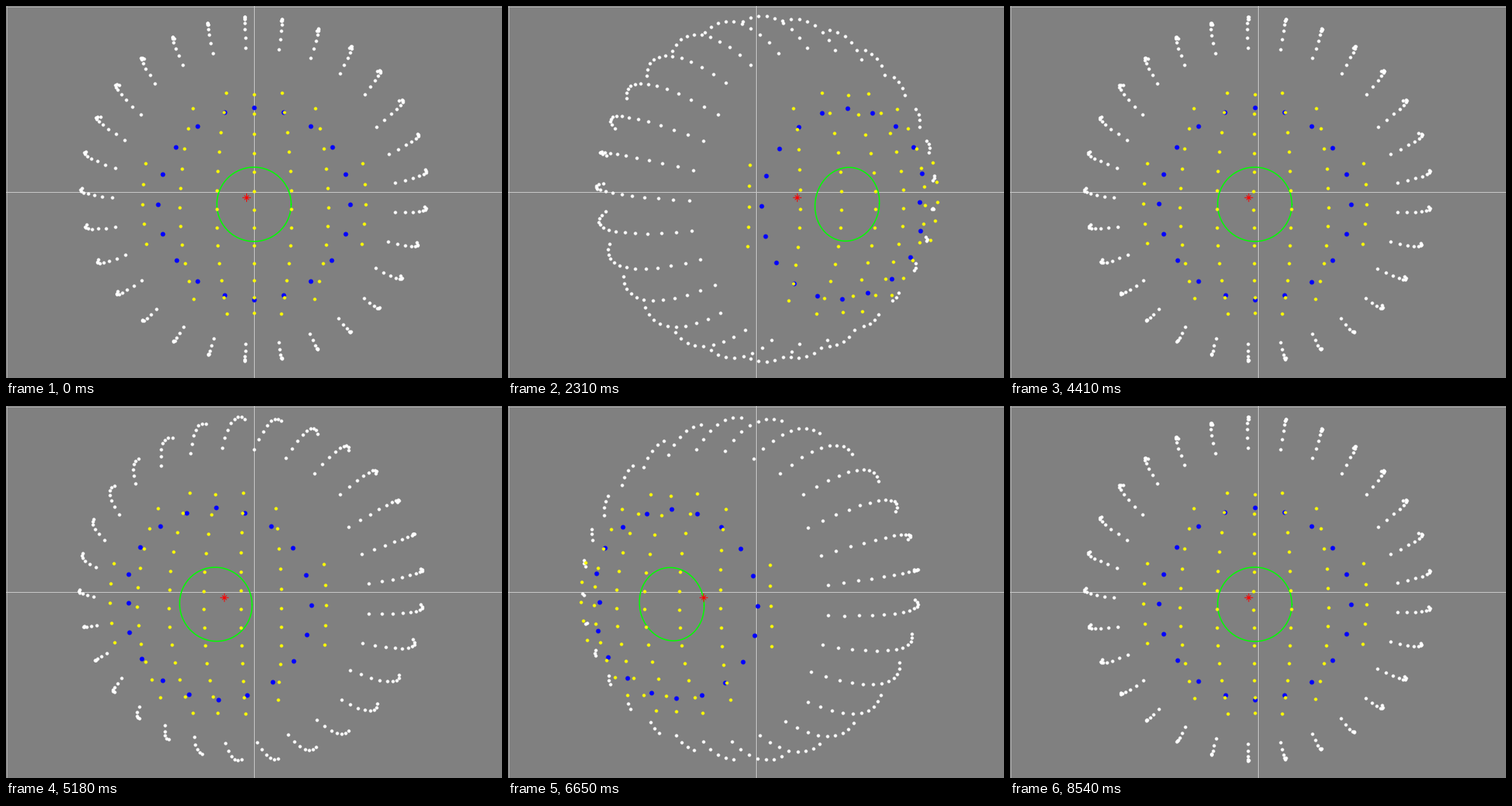
Animation, 640 px wide and 480 px high, one loop 8610 ms. Source, as a matplotlib script:

```python
import numpy as np
import matplotlib.pyplot as plt
from matplotlib.animation import FuncAnimation

W, H, DPI = 640, 480, 100
PX = 72 / DPI
CX, CY = 320, 240
FOCAL = 2600          # camera distance, in pixels at the corneal apex
PIVOT_X, PIVOT_Z = 20, 317
EYE_Y = -4.3          # height of the eye's centre against the camera axis
TILT = 0.087          # downward tilt of the optical axis
EYE_TILT, HEAD_TILT = 0.048, 0.038


def retina():
    """Grid of an ellipsoid in Jacobi coordinates, cut off at the front."""
    a, b, c = 248, 246, 220
    rho = (a**2 - b**2) / (a**2 - c**2)
    beta, omega = np.meshgrid(np.radians(np.linspace(-90, 90, 30)[1:-1]),
                              np.radians(180 + np.arange(29) * 360 / 29))
    x = a * np.sqrt(np.cos(beta)**2 + rho * np.sin(beta)**2) * np.cos(omega)
    y = b * np.cos(beta) * np.sin(omega)
    z = c * np.sin(beta) * np.sqrt(1 - rho * np.cos(omega)**2)
    keep = z < 139.2
    x, y, z = x[keep], y[keep], z[keep]
    return x, EYE_Y + y + TILT * z, 26 + z - EYE_TILT * y, y


def cornea():
    """Nearly square grid laid on the front of a long ellipsoid."""
    i, j = np.meshgrid(np.arange(-3, 4), np.arange(-6, 7))
    x = (48 * i + 0.14 * i**3) * (1 - 0.0067 * j**2)
    y = (23.75 * j + 0.013 * j**3) * (1 + 0.0135 * i**2)
    sag = 309 * (1 - np.sqrt(np.clip(1 - (x / 226)**2 - (y / 222)**2, 0, 1)))
    keep = sag < 87
    x, y, z = x[keep], y[keep], 309 - sag[keep]
    return x, EYE_Y + y + TILT * z, 8 + z - EYE_TILT * y, y


def iris(theta):
    angle = np.arange(20) * np.pi / 10
    ux, uy = np.cos(angle), np.sin(angle)
    # the far rim point is seen past the cornea, so without refraction
    direct = (np.abs(ux) > 0.99) & (ux * theta > np.radians(9))
    radius = np.where(direct, 124.5, 127.7)
    # refraction pushes the far side outwards, less so at the very rim
    far = (ux * theta > 0) & ~direct
    bulge = 70 * np.sin(theta) * ux**4 * (0.95 - ux**2)
    x, y = radius * ux + np.where(far, bulge, 0), radius * uy
    return x, 16 + y, np.where(direct, 232, 240) - EYE_TILT * y, y


def pupil(theta):
    angle = np.linspace(0, 2 * np.pi, 121)
    x = 49.2 * np.cos(angle) * (1 + 0.11 * np.sin(theta)**2)
    y = 49.2 * np.sin(angle)
    return x, 16.4 + y, 247 - EYE_TILT * y, y


def project(points, theta, cull=False):
    x, y, z, tall = points
    s, c = np.sin(theta), np.cos(theta)
    px = PIVOT_X + (x - PIVOT_X) * c + z * s
    pz = z * c - (x - PIVOT_X) * s - HEAD_TILT * tall
    py = y - HEAD_TILT * x * s
    scale = FOCAL / (FOCAL + PIVOT_Z - pz)
    px, py = CX + px * scale, CY + py * scale
    return (px[pz >= 0], py[pz >= 0]) if cull else (px, py)


def glint(theta):
    s = np.sin(theta)
    return 310.5 + 142.3 * s + 7.4 * s**2 - 70 * s**3, 247.3


def star(x, y):
    xs, ys = [], []
    for k, r in enumerate((5, 3.6, 5, 3.6)):
        dx, dy = r * np.cos(k * np.pi / 4), r * np.sin(k * np.pi / 4)
        xs += [x - dx, x + dx, np.nan]
        ys += [y - dy, y + dy, np.nan]
    return xs, ys


fig = plt.figure(figsize=(W / DPI, H / DPI), dpi=DPI, facecolor="#808080")
ax = fig.add_axes([0, 0, 1, 1])
ax.set_xlim(0, W)
ax.set_ylim(H, 0)
ax.axis("off")
for x, y, color in ((0.5, 0.5, "#acacac"), (CX - 0.5, CY - 0.5, "#c6c6c6")):
    ax.axvline(x, color=color, lw=PX, zorder=0)
    ax.axhline(y, color=color, lw=PX, zorder=0)


def dots(color, size, z):
    return ax.plot([], [], "o", color=color, ms=size * PX, mew=0, zorder=z)[0]


retina_dots = dots("white", 4.3, 2)
iris_dots = dots("#0000ff", 6, 3)
pupil_line, = ax.plot([], [], color="#00ff00", lw=1.5 * PX, zorder=4)
cornea_dots = dots("#ffff00", 4.3, 5)
glint_star, = ax.plot([], [], color="#ff0000", lw=PX, zorder=6)

RETINA, CORNEA = retina(), cornea()
# a swing right, left and back, one degree per step, pausing at each turn
AZIMUTH = np.radians(np.roll(np.concatenate(
    [np.arange(0, 31), np.arange(30, -31, -1), np.arange(-30, 1)]), 1))


def update(n):
    theta = AZIMUTH[n]
    retina_dots.set_data(*project(RETINA, theta, cull=True))
    iris_dots.set_data(*project(iris(theta), theta))
    pupil_line.set_data(*project(pupil(theta), theta))
    cornea_dots.set_data(*project(CORNEA, theta))
    glint_star.set_data(*star(*glint(theta)))
    return retina_dots, iris_dots, pupil_line, cornea_dots, glint_star


anim = FuncAnimation(fig, update, frames=len(AZIMUTH), interval=70,
                     repeat=True, repeat_delay=0, blit=False)
plt.show()
```
